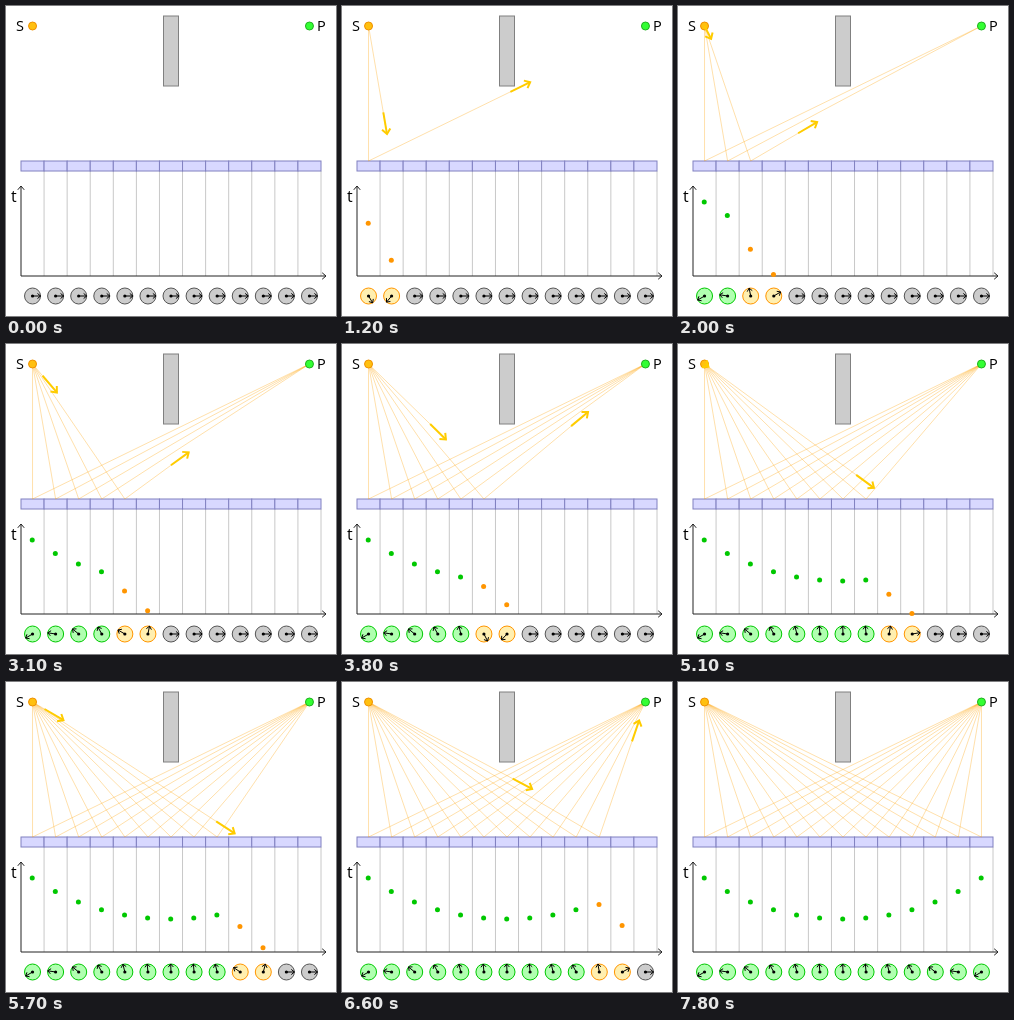
Recreate the animation shown at these times as an HTML page with a canvas. Size 330 by 310 pixels, loop 8000 ms.

```html
<!DOCTYPE html>
<html lang="en">
<head>
<meta charset="utf-8">
<title>Light paths at a mirror</title>
<style>
html, body { margin: 0; width: 100%; height: 100%; overflow: hidden; background: #fff; }
canvas { display: block; }
</style>
</head>
<body>
<canvas id="stage" width="330" height="310"></canvas>
<script>
const ctx = document.getElementById('stage').getContext('2d');
const LOOP = 8000, STEP = 100;
const COUNT = 13, LEFT = 15, RIGHT = 315, CELL = (RIGHT - LEFT) / COUNT;
const MIRROR = 155, AXIS = 270, CLOCK_Y = 290;
const FIRST = 401, INTERVAL = 520.8, SPEED = 0.394;   // ms, ms, px per ms
const TURN = 2.1 * Math.PI / 180;                     // clock rotation per px of path
const ARROW = 22;

const columnX = i => LEFT + (i + 0.5) * CELL;
const source = { x: columnX(0), y: 20 };
const detector = { x: columnX(COUNT - 1), y: 20 };
const distance = (a, b) => Math.hypot(b.x - a.x, b.y - a.y);

const paths = Array.from({ length: COUNT }, (_, i) => {
  const hit = { x: columnX(i), y: MIRROR };
  const first = distance(source, hit);
  return { hit, first, total: first + distance(hit, detector), start: FIRST + i * INTERVAL };
});
const shortest = paths[(COUNT - 1) / 2].total;
for (const p of paths) p.height = 33 + 0.73 * (p.total - shortest);

const STATES = {
  waiting: { line: '#555', fill: '#ccc' },
  running: { line: '#ff9500', fill: '#ffefb0' },
  done: { line: '#00c800', fill: '#b0ffb0' }
};

function line(color, width, ...points) {
  ctx.strokeStyle = color;
  ctx.lineWidth = width;
  ctx.beginPath();
  for (const p of points) ctx.lineTo(p.x, p.y);
  ctx.stroke();
}

function disc(x, y, r, fill, stroke) {
  ctx.beginPath();
  ctx.arc(x, y, r, 0, 2 * Math.PI);
  ctx.fillStyle = fill;
  ctx.fill();
  if (stroke) {
    ctx.strokeStyle = stroke;
    ctx.lineWidth = 1;
    ctx.stroke();
  }
}

function box(x, y, w, h, fill, stroke) {
  ctx.fillStyle = fill;
  ctx.fillRect(x, y, w, h);
  ctx.strokeStyle = stroke;
  ctx.lineWidth = 1;
  ctx.strokeRect(x, y, w, h);
}

function arrow(from, to, color, width, head, spread) {
  const angle = Math.atan2(to.y - from.y, to.x - from.x);
  const wing = side => ({
    x: to.x - head * Math.cos(angle + side * spread),
    y: to.y - head * Math.sin(angle + side * spread)
  });
  line(color, width, from, to);
  line(color, width, wing(1), to, wing(-1));
}

function along(a, b, d) {
  const f = d / distance(a, b);
  return { x: a.x + (b.x - a.x) * f, y: a.y + (b.y - a.y) * f };
}

function drawScene() {
  ctx.fillStyle = '#fff';
  ctx.fillRect(0, 0, 330, 310);
  for (let i = 1; i <= COUNT; i++) {
    const x = LEFT + i * CELL;
    line('#c8c8c8', 1, { x, y: MIRROR + 10 }, { x, y: AXIS });
  }
  for (let i = 0; i < COUNT; i++) box(LEFT + i * CELL, MIRROR, CELL, 10, '#d8d8ff', '#8080c0');
  box(157.5, 10, 15, 70, '#ccc', '#808080');
  const origin = { x: LEFT, y: AXIS };
  arrow(origin, { x: LEFT, y: 180 }, '#222', 1, 5, 0.7);
  arrow(origin, { x: 320, y: AXIS }, '#222', 1, 5, 0.7);
  ctx.fillStyle = '#000';
  ctx.font = '14.5px "Open Sans", "Noto Sans", sans-serif';
  ctx.fillText('S', 10, 25);
  ctx.fillText('P', 311, 25);
  ctx.font = '16px "Open Sans", "Noto Sans", sans-serif';
  ctx.fillText('t', 5, 196);
}

function drawTrail({ hit, first }, d) {
  const points = d <= first
    ? [source, along(source, hit, d)]
    : [source, hit, along(hit, detector, d - first)];
  line('rgba(255,160,0,0.33)', 1, ...points);
}

function drawPhoton({ hit, first }, d) {
  const [a, b, s] = d <= first ? [source, hit, d] : [hit, detector, d - first];
  arrow(along(a, b, Math.max(0, s - ARROW)), along(a, b, s), '#ffcc00', 2, 6.5, 0.7);
}

function drawClock(x, d, state) {
  disc(x, CLOCK_Y, 8, state.fill, state.line);
  const angle = d * TURN;
  const tip = { x: x + 8 * Math.cos(angle), y: CLOCK_Y - 8 * Math.sin(angle) };
  disc(x, CLOCK_Y, 1.6, '#000');
  arrow({ x, y: CLOCK_Y }, tip, '#000', 1, 4, 0.7);
}

function draw(time) {
  drawScene();
  const now = paths.map(p => {
    const d = Math.min(p.total, Math.max(0, (time - p.start) * SPEED));
    return { p, d, state: d === 0 ? 'waiting' : d < p.total ? 'running' : 'done' };
  });
  for (const { p, d } of now) if (d > 0) drawTrail(p, d);
  disc(source.x, source.y, 4, '#ffc010', '#f09000');
  disc(detector.x, detector.y, 4, '#33ff33', '#20b020');
  for (const { p, d, state } of now) {
    drawClock(p.hit.x, d, STATES[state]);
    if (d > 0) disc(p.hit.x - 0.3, AXIS - p.height * d / p.total, 2.5, STATES[state].line);
    if (state === 'running') drawPhoton(p, d);
  }
}

const began = performance.now();
function tick() {
  const t = (performance.now() - began) % LOOP;
  draw(Math.floor(t / STEP) * STEP);
  requestAnimationFrame(tick);
}
tick();
</script>
</body>
</html>
```
